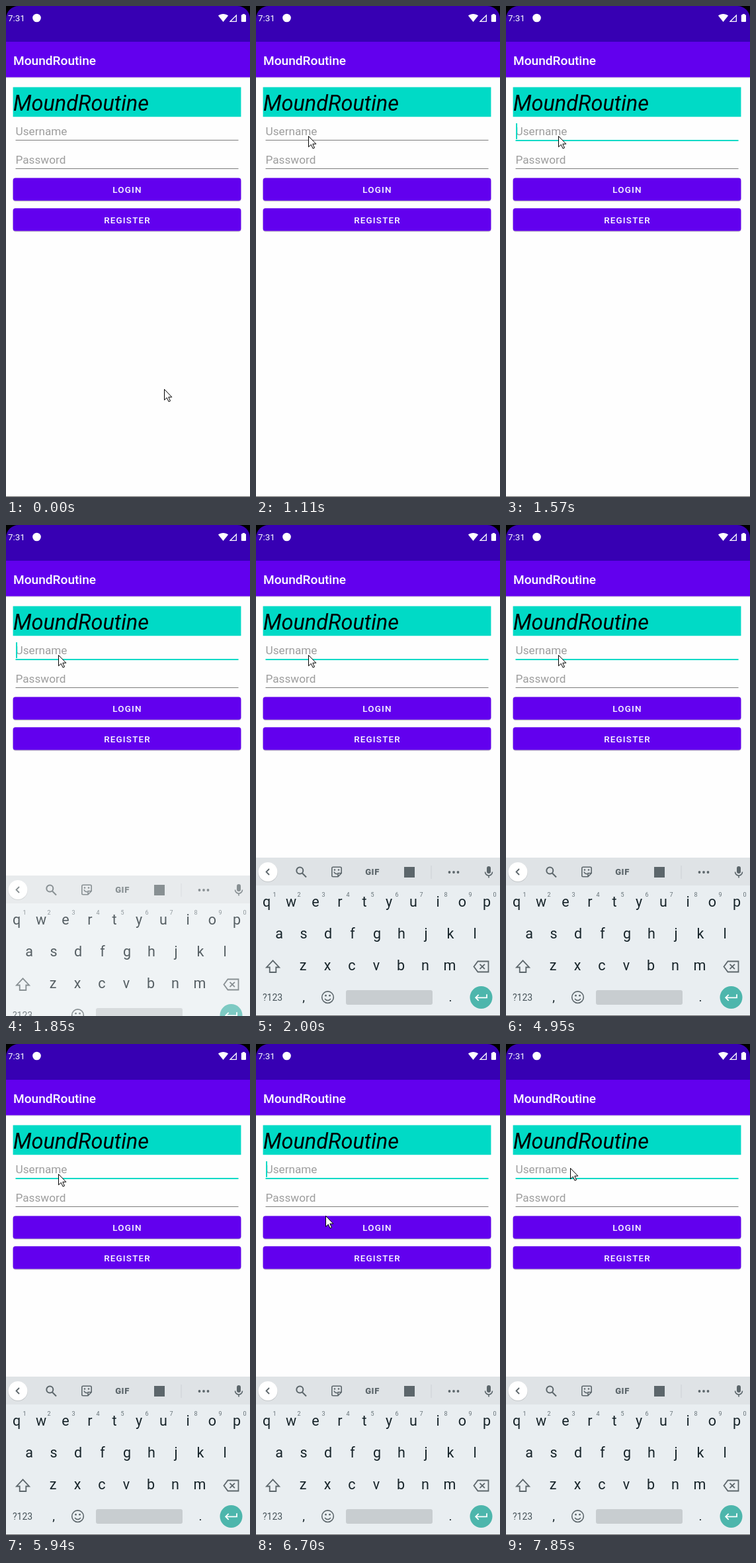
Recreate the animation shown at these times as an HTML page with a canvas. Size 369 by 741 pixels, loop 8 s.

```html
<!DOCTYPE html>
<html lang="en">
<head>
<meta charset="utf-8">
<title>Login screen</title>
<style>
html, body { margin: 0; width: 100%; height: 100%; overflow: hidden; background: #fefefe; }
canvas { display: block; width: 369px; height: 741px; }
</style>
</head>
<body>
<canvas id="stage"></canvas>
<script>
const W = 369, H = 741, LOOP = 8000;
const APP = 'MoundRoutine';
const PURPLE = '#6200ee', DARK = '#3700b3', TEAL = '#00dac6';
const ICON = '#5c666b', KEY = '#17242a';
const LEFT = 10.6, WIDTH = 344.8;

const canvas = document.getElementById('stage');
const ctx = canvas.getContext('2d');
const dpr = window.devicePixelRatio || 1;
canvas.width = W * dpr;
canvas.height = H * dpr;

// Pointer positions: time, x, y. Each is held until the next.
const pointerKeys = [
  [0, 239, 578], [130, 224, 512], [250, 209, 420], [370, 230, 344],
  [630, 200, 312], [750, 158, 268], [870, 117, 229], [990, 90, 204], [1110, 79, 196],
  [6440, 79, 202], [6580, 93, 232], [6700, 105, 259], [6820, 107, 264],
  [6940, 102, 250], [7060, 97, 235], [7210, 97, 214], [7330, 97, 196], [7450, 97, 187]
];
const FOCUS = 1420, KEYS_RISE = 1850, KEYS_UP = 2000;
const caretFlips = [1420, 2000, 2430, 3040, 3480, 3910, 4490, 4950, 5510, 5940, 6440, 7060, 7450, 7850];

function box(x, y, w, h, color, r = 0) {
  ctx.fillStyle = color;
  ctx.beginPath();
  ctx.roundRect(x, y, w, h, r);
  ctx.fill();
}

function disc(x, y, r, color) {
  ctx.fillStyle = color;
  ctx.beginPath();
  ctx.arc(x, y, r, 0, Math.PI * 2);
  ctx.fill();
}

function text(str, x, y, size, color, { weight = 400, style = 'normal', align = 'left', spacing = 0 } = {}) {
  ctx.font = `${style} ${weight} ${size}px Roboto, sans-serif`;
  ctx.letterSpacing = spacing + 'px';
  ctx.textAlign = align;
  ctx.fillStyle = color;
  ctx.fillText(str, x, y);
}

// SVG path drawn around (x, y).
function icon(d, x, y, { fill, stroke, width = 1.6 }) {
  const path = new Path2D(d);
  ctx.save();
  ctx.translate(x, y);
  if (fill) {
    ctx.fillStyle = fill;
    ctx.fill(path);
  }
  if (stroke) {
    ctx.strokeStyle = stroke;
    ctx.lineWidth = width;
    ctx.stroke(path);
  }
  ctx.restore();
}

function bottomEdge() {
  box(0, H - 1, W, 1, '#6f6f6f');
}

function statusBar() {
  box(0, 0, W, 54, DARK);
  icon('M0 0H19A19 19 0 0 0 0 19Z', 0, 0, { fill: '#000' });
  icon('M0 0H-19A19 19 0 0 1 0 19Z', W, 0, { fill: '#000' });
  text('7:31', 3, 23, 13.4, '#fff');
  disc(46.5, 18, 6.3, '#fff');
  icon('M0 12L-7.6 2.6C-3.4 -.9 3.4 -.9 7.6 2.6Z', 328.5, 12, { fill: '#fff' });
  icon('M1.6 10.8L10.8 1.6V10.8Z', 337.5, 12.5, { stroke: '#fff', width: 1.3 });
  box(355.8, 13.2, 7.2, 10.8, '#fff', 1);
  box(357.7, 12, 3.4, 2, '#fff');
}

function button(label, y) {
  box(LEFT, y + 1.5, WIDTH, 34, 'rgba(0,0,0,.22)', 4);
  box(LEFT, y, WIDTH, 34.3, PURPLE, 3.5);
  text(label, 183.5, y + 22.2, 13.4, '#fff', { weight: 500, align: 'center', spacing: 1.2 });
}

function form(focused, caret) {
  box(0, 0, W, H, '#fefefe');
  box(0, 107, W, 2, '#e3e0e8');
  box(0, 53.5, W, 54, PURPLE);
  text(APP, 11, 88.5, 19.1, '#fff', { weight: 500 });
  box(LEFT, 122.6, WIDTH, 44.7, TEAL);
  text(APP, 11, 158, 32.5, '#000', { style: 'italic' });

  text('Username', 14.5, 195.4, 17.2, '#9d9d9d');
  if (caret) box(15, 177, 2, 24, TEAL);
  if (focused) box(14.5, 202, 337, 2, TEAL);
  else box(14.5, 202, 337, 1, '#7c7c7c');
  text('Password', 14.5, 238, 17.2, '#9d9d9d');
  box(14.5, 245, 337, 1, '#7c7c7c');

  button('LOGIN', 259.5);
  button('REGISTER', 305.3);
  bottomEdge();
}

function keyRow(letters, x, y) {
  [...letters].forEach((c, i) => text(c, x + i * 37, y, 21.5, KEY, { align: 'center' }));
}

function suggestions() {
  const y = 523.5;
  disc(18, y + .8, 14.8, 'rgba(0,0,0,.12)');
  disc(18, y, 14.5, '#fff');
  icon('M2 -4.5L-2.5 0L2 4.5', 18, y, { stroke: ICON, width: 1.8 });
  icon('M3.3 -2A5 5 0 1 1 -6.7 -2A5 5 0 1 1 3.3 -2M2 2L8 8', 68, y, { stroke: ICON, width: 2 });
  icon('M-5.5 -7.2H5.5Q7.2 -7.2 7.2 -5.5V2L2 7.2H-5.5Q-7.2 7.2 -7.2 5.5V-5.5Q-7.2 -7.2 -5.5 -7.2Z' +
    'M7 2H2V7M-4 0Q-2.5 3.6 1 3', 122, y, { stroke: ICON });
  disc(119, 520.5, 1.2, ICON);
  disc(125, 520.5, 1.2, ICON);
  text('GIF', 176, 528, 13, ICON, { weight: 900, align: 'center', spacing: .6 });
  box(224, 516, 16, 16, ICON);
  box(264.5, 514, 1, 20, '#cdd2d5');
  for (const x of [292.5, 299, 305.5]) disc(x, y + .5, 1.9, ICON);
  box(349, 515, 6, 11, ICON, 3);
  icon('M-5.5 0A5.5 5.5 0 0 0 5.5 0M0 5.5V9', 352, y, { stroke: ICON });
}

function keyboard() {
  box(0, 502, W, 42, '#dfe3e6');
  box(0, 544, W, H - 544, '#e9eef1');
  suggestions();

  keyRow('qwertyuiop', 16, 576);
  [...'1234567890'].forEach((c, i) => text(c, 28 + i * 37, 561, 9, '#667278', { align: 'center' }));
  keyRow('asdfghjkl', 35, 624);
  keyRow('zxcvbnm', 71, 671.5);

  icon('M0 -9.2L-9.6 1H-4.8V8.5H4.8V1H9.6Z', 25.5, 666.5, { stroke: ICON, width: 1.8 });
  icon('M-11 0L-5 -8H11V8H-5Z M-2 -3.7L5.4 3.7M5.4 -3.7L-2 3.7', 340.5, 666.5, { stroke: ICON, width: 1.8 });

  text('?123', 10, 717.5, 14, '#48545a');
  text(',', 72, 718.5, 19, KEY, { align: 'center' });
  icon('M8.8 0A8.8 8.8 0 1 1 -8.8 0A8.8 8.8 0 1 1 8.8 0M-4.5 2.2Q0 7.5 4.5 2.2', 108.5, 712.7, { stroke: ICON });
  disc(105.5, 710.2, 1.4, ICON);
  disc(111.5, 710.2, 1.4, ICON);
  box(136, 702, 131, 22, '#c8cdd0', 3);
  text('.', 294, 718.5, 19, KEY, { align: 'center' });
  disc(340.5, 713, 17, '#4db6ac');
  icon('M8.5 -5V0H-8M-3.8 -4.5L-8.3 0L-3.8 4.5', 340.5, 713.3, { stroke: '#fff', width: 1.8 });
  bottomEdge();
}

function risingKeyboard() {
  ctx.save();
  ctx.translate(0, 27);
  keyboard();
  ctx.restore();
  box(0, 529, W, H - 529, 'rgba(255,255,255,.27)');
}

function pointer(t) {
  const [, x, y] = pointerKeys.findLast(k => k[0] <= t);
  icon('M0 0V16.2L3.8 12.7L6.6 18.6L9 17.5L6.3 11.7H11.3Z', x + .5, y + .5,
    { fill: '#fff', stroke: '#000', width: 1 });
}

function draw(t) {
  ctx.setTransform(dpr, 0, 0, dpr, 0, 0);
  const caret = caretFlips.filter(f => f <= t).length % 2 === 1;
  form(t >= FOCUS, caret);
  statusBar();
  if (t >= KEYS_UP) keyboard();
  else if (t >= KEYS_RISE) risingKeyboard();
  pointer(t);
}

const start = performance.now();
function tick() {
  draw((performance.now() - start) % LOOP);
  requestAnimationFrame(tick);
}
tick();
</script>
</body>
</html>
```
